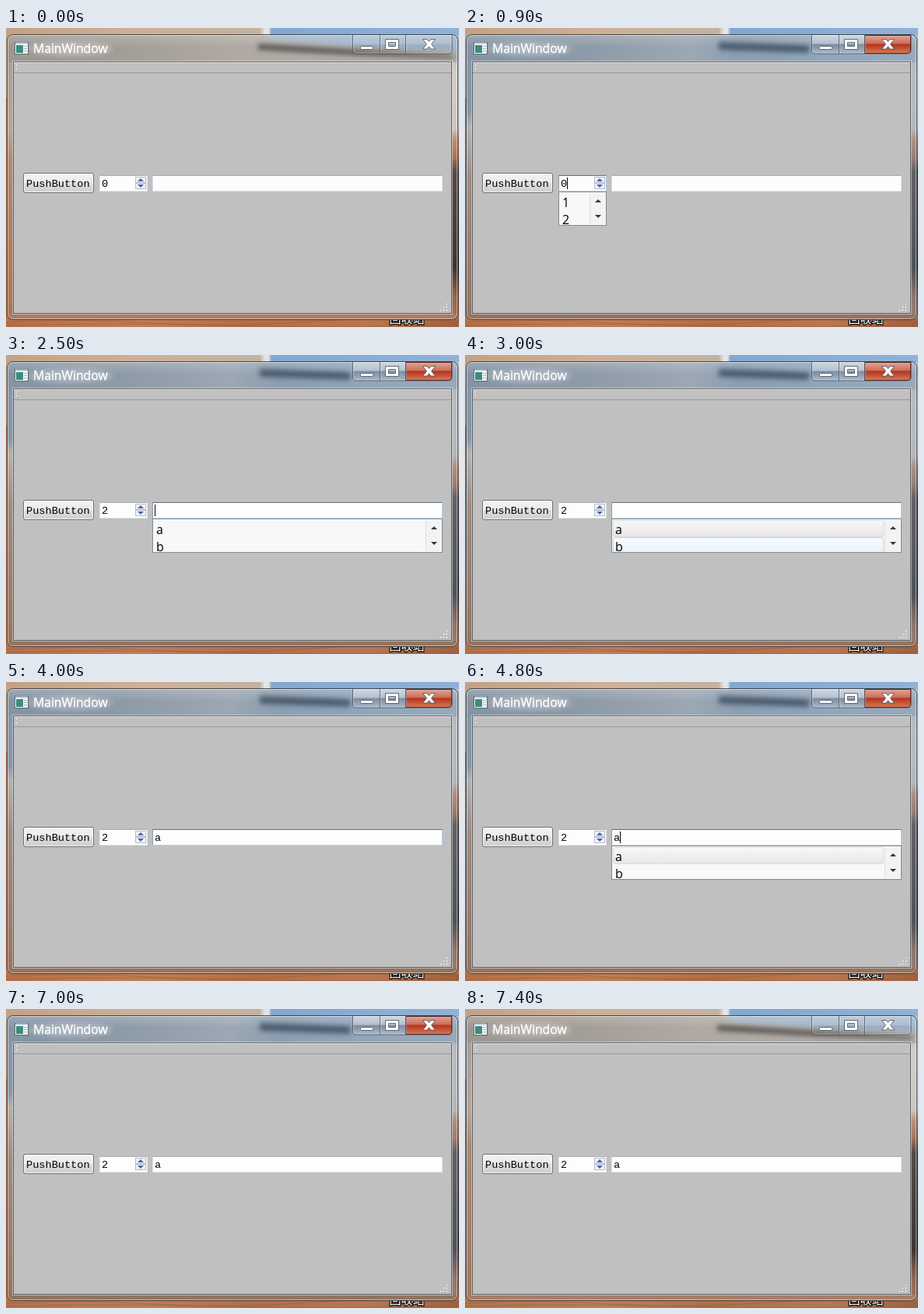
These frames come from a looping animation (582x384 px, 7.5 s). An HTML page:

```html
<!DOCTYPE html>
<html lang="en">
<head>
<meta charset="utf-8">
<title>Spin box and line edit</title>
<style>
  html, body { margin: 0; width: 100%; height: 100%; overflow: hidden; }
  body {
    --norm: #a9abb0 #dfe0e6 #e0e5ea #dfe0e6;
    --hot: #7d97ad #b9d2e6 #c6dfee #b9d2e6;
    --focus: #62707c #a6c8e2 #b7d7ea #8f9eab;
    --none: linear-gradient(transparent, transparent);
    --gray: linear-gradient(#f8f8f8, #e6e6e6);
    --blue: linear-gradient(#f7fbfe, #e8f3fc);
    --press: linear-gradient(#e4f1fc, #cbe3f8);
  }
  #stage { position: relative; width: 582px; height: 384px; overflow: hidden; background: #b37a58; }
  #stage > *, .popup > *, .spin i { position: absolute; box-sizing: border-box; }
  svg { left: 0; top: 0; }
  .anim { animation: 7.5s step-end infinite; }
  .active { animation-name: active; }
  .title { font: 15.7px "Open Sans", "Noto Sans", sans-serif; fill: #fff; stroke: #fff; stroke-width: .35px; }
  .label { font: 15px "Noto Sans CJK SC", "Noto Sans CJK", sans-serif; fill: #fff; }
  .mono { font: 13.6px/18px "Liberation Mono", monospace; color: #000; white-space: pre; }

  .button {
    left: 22px; top: 186px; width: 91px; height: 26px; border: 1px solid #707070; border-radius: 3px;
    padding: 5px 0 0 3px; box-shadow: inset 0 0 0 1px #fcfcfccc;
    animation-name: button;
  }
  .field { top: 189px; height: 21px; border: 1px solid; border-color: var(--norm); background: #fdfdfd; }
  .spin { left: 120px; width: 62px; animation-name: spin; }
  .line { left: 188px; width: 373px; animation-name: line; }
  .spin i { left: 45px; width: 14px; height: 8px; border: 1px solid #b5bccb; background: #f1f2f5; }
  .spin i:nth-child(1) { top: 1px; }
  .spin i:nth-child(2) { top: 9px; }
  .spin i::after, .bar::before, .bar::after { content: ""; position: absolute; background: #4b64ae; }
  .spin i::after { left: 2px; top: 1px; width: 8px; height: 4px; }
  .spin i:nth-child(1)::after, .bar::before { clip-path: polygon(50% 0, 100% 100%, 0 100%); }
  .spin i:nth-child(2)::after, .bar::after { clip-path: polygon(0 0, 100% 0, 50% 100%); }
  .value { top: 192px; opacity: 0; }
  .caret { top: 192px; width: 1px; height: 15px; background: #000; opacity: 0; }

  .popup {
    top: 210px; height: 44px; border: 1px solid #868b91; background: #f8f8f8;
    overflow: hidden; opacity: 0; font: 16px/22px "Open Sans", "Noto Sans", sans-serif;
  }
  .popup.p1 { left: 120px; width: 62px; animation-name: popup1; }
  .popup.p2 { left: 188px; width: 373px; animation-name: popup2; }
  .item { left: 1px; right: 22px; height: 22px; padding-left: 2px; border: 1px solid transparent; border-radius: 3px; }
  .item:nth-child(1) { top: 1px; }
  .item:nth-child(2) { top: 23px; }
  .bar { right: 0; top: 1px; width: 21px; height: 40px; border-left: 1px solid #dedede; background: #f3f3f3; }
  .bar::before, .bar::after { left: 6px; width: 8px; height: 4px; background: #383838; }
  .bar::before { top: 8px; }
  .bar::after { top: 28px; }

  @keyframes active { 0%, 98.66%, 100% { opacity: 0 } 12% { opacity: 1 } }
  @keyframes spin {
    0%, 32% { border-color: var(--norm) }
    8% { border-color: #96a4b0 #d2dce7 #d7e2eb }
    9.33%, 30.66% { border-color: var(--hot) }
    12% { border-color: var(--focus) }
  }
  @keyframes line {
    0% { border-color: #a3a8b0 #d6dee8 #d9e3ea }
    4%, 76% { border-color: var(--norm) }
    30.66% { border-color: #96a4b0 #d2dce7 #d7e2eb }
    32% { border-color: var(--hot) }
    33.33%, 73.33% { border-color: var(--focus) }
    66.66% { border-color: #6a7a88 #afcde3 #bbd9ea #97a7b4 }
  }
  @keyframes zero { 0% { opacity: 1 } 28%, 100% { opacity: 0 } }
  @keyframes two { 0% { opacity: 0 } 28%, 100% { opacity: 1 } }
  @keyframes letter { 0% { opacity: 0 } 53.33%, 100% { opacity: 1 } }
  @keyframes caret1 { 0%, 17.33%, 30.66%, 100% { opacity: 0 } 12%, 22.66% { opacity: 1 } }
  @keyframes caret2 {
    0%, 40% { opacity: 0; left: 191px }
    33.33%, 46.66% { opacity: 1; left: 191px }
    53.33%, 66.66%, 76%, 100% { opacity: 0; left: 199px }
    60%, 73.33% { opacity: 1; left: 199px }
  }
  @keyframes popup1 { 0%, 28%, 100% { opacity: 0 } 12% { opacity: 1 } }
  @keyframes popup2 { 0%, 53.33%, 76%, 100% { opacity: 0 } 33.33%, 64% { opacity: 1 } }
  @keyframes one-item {
    0% { background: var(--none); border-color: transparent }
    17.33% { background: var(--blue); border-color: #b8d6fb }
    21.33%, 100% { background: var(--gray); border-color: #dcdcdc }
  }
  @keyframes two-item {
    0% { background: var(--none); border-color: transparent }
    22.66% { background: #f3f8fc; border-color: #d4e5f8 }
    24% { background: var(--blue); border-color: #b8d6fb }
    26.66%, 100% { background: var(--press); border-color: #99c3ee }
  }
  @keyframes a-item {
    0% { background: var(--none); border-color: transparent }
    36%, 42.66% { background: var(--blue); border-color: #b8d6fb }
    38.66%, 53.33%, 100% { background: var(--gray); border-color: #dcdcdc }
  }
  @keyframes b-item {
    0%, 42.66%, 100% { background: var(--none); border-color: transparent }
    38.66% { background: #f3f8fc; border-color: #d4e5f8 }
    40% { background: var(--blue); border-color: #b8d6fb }
  }
  @keyframes button {
    0%, 93.33%, 100% { border-color: #707070; background: linear-gradient(#f2f2f2, #ebebeb 48%, #dddddd 52%, #cfcfcf) }
    77.33%, 90.66% { border-color: #567891; background: linear-gradient(#eef4f8, #e2eef4 48%, #cee2ee 52%, #bbd4e2) }
    78.66%, 86.66% { border-color: #3c7fb1; background: linear-gradient(#eaf6fd, #d9f0fc 48%, #bee6fd 52%, #a7d9f5) }
    81.33% { border-color: #2c628b; background: linear-gradient(#e0f1fa, #c4e5f6 48%, #98d1ef 52%, #7fc0e2) }
  }
</style>
</head>
<body>
<div id="stage">
  <svg width="582" height="384" viewBox="0 0 582 384">
    <defs>
      <linearGradient id="sky">
        <stop offset="0" stop-color="#c4a184"/><stop offset=".3" stop-color="#ceb197"/>
        <stop offset=".56" stop-color="#c4b2a0"/><stop offset=".572" stop-color="#e9e6e2"/>
        <stop offset=".58" stop-color="#dfe3e8"/><stop offset=".586" stop-color="#82a8d2"/><stop offset="1" stop-color="#8fb2d6"/>
      </linearGradient>
      <linearGradient id="wood">
        <stop offset="0" stop-color="#b5714a"/><stop offset=".3" stop-color="#c07d56"/>
        <stop offset=".55" stop-color="#b26e47"/><stop offset=".8" stop-color="#b97650"/><stop offset="1" stop-color="#a0623f"/>
      </linearGradient>
      <linearGradient id="warm">
        <stop offset="0" stop-color="#9c9690"/><stop offset=".25" stop-color="#a39d97"/>
        <stop offset=".5" stop-color="#b0a9a2"/><stop offset="1" stop-color="#b3afab"/>
      </linearGradient>
      <linearGradient id="cool">
        <stop offset="0" stop-color="#8494a5"/><stop offset=".25" stop-color="#8d9aa7"/><stop offset=".5" stop-color="#9ca8b3"/>
        <stop offset=".6" stop-color="#8c9eb1"/><stop offset=".8" stop-color="#91a6bc"/><stop offset="1" stop-color="#98a9ba"/>
      </linearGradient>
      <linearGradient id="leftWarm" x2="0" y2="1">
        <stop offset="0" stop-color="#a39d97"/><stop offset=".33" stop-color="#b3a69b"/>
        <stop offset=".45" stop-color="#ab8a74"/><stop offset="1" stop-color="#a87558"/>
      </linearGradient>
      <linearGradient id="leftCool" x2="0" y2="1">
        <stop offset="0" stop-color="#8799ab"/><stop offset=".27" stop-color="#8496a8"/><stop offset=".32" stop-color="#b3b2b2"/>
        <stop offset=".5" stop-color="#9c8d84"/><stop offset="1" stop-color="#96745f"/>
      </linearGradient>
      <linearGradient id="right" x2="0" y2="1">
        <stop offset="0" stop-color="#b9bbbd"/><stop offset=".14" stop-color="#cfcdca"/><stop offset=".33" stop-color="#cbc5c0"/>
        <stop offset=".37" stop-color="#bb8e72"/><stop offset=".43" stop-color="#a67458"/><stop offset=".48" stop-color="#544a46"/>
        <stop offset=".82" stop-color="#3b3534"/><stop offset=".92" stop-color="#94664e"/><stop offset="1" stop-color="#a87053"/>
      </linearGradient>
      <linearGradient id="sheen" x2="0" y2="1">
        <stop offset="0" stop-color="#fff" stop-opacity=".2"/><stop offset="1" stop-color="#fff" stop-opacity="0"/>
      </linearGradient>
      <linearGradient id="red" x2="0" y2="1">
        <stop offset="0" stop-color="#e0a799"/><stop offset=".45" stop-color="#cb6d57"/>
        <stop offset=".5" stop-color="#b5331f"/><stop offset="1" stop-color="#d57a55"/>
      </linearGradient>
      <linearGradient id="cap" x2="0" y2="1">
        <stop offset="0" stop-color="#fff" stop-opacity=".45"/><stop offset=".48" stop-color="#fff" stop-opacity=".25"/>
        <stop offset=".52" stop-color="#223" stop-opacity=".2"/><stop offset="1" stop-color="#fff" stop-opacity=".2"/>
      </linearGradient>
      <filter id="soft" x="-30%" y="-100%" width="160%" height="300%"><feGaussianBlur stdDeviation="3"/></filter>
      <clipPath id="frame"><rect x="2" y="9" width="578" height="365" rx="7"/></clipPath>
    </defs>

    <rect width="582" height="120" fill="url(#sky)"/>
    <rect y="90" width="582" height="294" fill="url(#wood)"/>
    <rect x="578" y="9" width="4" height="365" fill="url(#right)"/>
    <path d="M0 378q90-5 190 1t200-2 192 1M0 382q140-4 280 0t302-1" fill="none" stroke="#8f5836" stroke-opacity=".45"/>
    <text class="label" x="492.500" y="378.500" stroke="#111" stroke-width="2.500" paint-order="stroke">回收站</text>

    <g clip-path="url(#frame)">
      <rect x="2" y="9" width="10" height="365" fill="url(#leftWarm)"/>
      <rect x="570" y="9" width="10" height="365" fill="url(#right)"/>
      <rect x="2" y="9" width="578" height="35" fill="url(#warm)"/>
      <rect x="2" y="367" width="578" height="7" fill="#ab7d65"/>
      <path d="M338 5H590V30L450 24 338 15Z" fill="#a0b6cc" filter="url(#soft)"/>
      <path d="M324 20 450 28 575 35V39L450 35 324 28Z" fill="#5c5854" filter="url(#soft)"/>
      <g class="anim active">
        <rect x="2" y="9" width="10" height="365" fill="url(#leftCool)"/>
        <rect x="570" y="9" width="10" height="365" fill="#7e97b2" fill-opacity=".3"/>
        <rect x="2" y="9" width="578" height="35" fill="url(#cool)"/>
        <rect x="2" y="367" width="578" height="7" fill="#94745f"/>
        <path d="M326 17 442 22V32L326 28Z" fill="#4b5c6f" filter="url(#soft)"/>
      </g>
      <ellipse cx="83" cy="27" rx="54" ry="9" fill="#fff" fill-opacity=".28" filter="url(#soft)"/>
      <rect x="2" y="9" width="578" height="16" fill="url(#sheen)"/>
    </g>
    <g fill="none">
      <rect x="1.500" y="8.500" width="579" height="366" rx="7.500" stroke="#2f3236" stroke-opacity=".85"/>
      <rect x="2.500" y="9.500" width="577" height="364" rx="6.500" stroke="#fff" stroke-opacity=".5"/>
      <rect x="8.500" y="42.500" width="565" height="325" stroke="#fff" stroke-opacity=".45"/>
    </g>
    <rect x="9.500" y="43.500" width="563" height="323" fill="#c0c0c0" stroke="#5d5f62"/>
    <path d="M10 44.500H572" stroke="#e4e4e4"/>
    <path d="M10 57.500H572" stroke="#989898"/>
    <path d="M13 47h2v2h-2zm0 5h2v2h-2z" fill="#efefef"/>
    <path d="M14 48h1v1h-1zm0 5h1v1h-1z" fill="#909090"/>
    <path d="M566 354h2v2h-2zm0 4h2v2h-2zm-4 0h2v2h-2zm4 4h2v2h-2zm-4 0h2v2h-2zm-4 0h2v2h-2z" fill="#f2f2f2"/>
    <path d="M567 355h1v1h-1zm0 4h1v1h-1zm-4 0h1v1h-1zm4 4h1v1h-1zm-4 0h1v1h-1zm-4 0h1v1h-1z" fill="#8a8a8a"/>

    <rect x="11.500" y="18.500" width="17" height="15" fill="#f4f6f7" stroke="#5f6b73"/>
    <path d="M12 19.500H28" stroke="#b9c9d6" stroke-width="2"/>
    <rect x="13" y="22" width="9" height="10" fill="#3c8c80"/>
    <path d="M23 23.500h4M23 26.500h4M23 29.500h4" stroke="#aab2b8"/>
    <text class="title" x="35" y="32">MainWindow</text>

    <path id="caption" d="M445.500 9V28q0 5 5 5H568q5 0 5-5V9" fill="url(#cap)" fill-opacity=".3" stroke="#41474d" stroke-opacity=".7"/>
    <path class="anim active" d="M446 9V32H514V9Z" fill="url(#cap)" fill-opacity=".8"/>
    <path d="M446.500 10V28q0 4 4 4H567q4.500 0 4.500-4V10" fill="none" stroke="#fff" stroke-opacity=".35"/>
    <path class="anim active" d="M514 9.500H572.500V28q0 4.500-4.500 4.500H514Z" fill="url(#red)" stroke="#5a2a25"/>
    <path d="M480.500 9V33M513.500 9V33" stroke="#41474d" stroke-opacity=".7"/>
    <path d="M481.500 10V32M514.500 10V32" stroke="#fff" stroke-opacity=".35"/>
    <g fill="#fff" stroke="#474b55" stroke-opacity=".8">
      <rect x="455.500" y="23.500" width="16" height="4" rx="1"/>
      <path fill-rule="evenodd" d="M487.500 14.500H504.500V27.500H487.500ZM491.500 18.500V23.500H500.500V18.500Z"/>
      <path d="M535.500 14.500h5.500l2.500 3 2.500-3h5.500l-5 6.200 5 6.300h-5.500l-2.500-3.200-2.500 3.200h-5.500l5-6.300z"/>
    </g>
  </svg>

  <div class="button mono anim">PushButton</div>
  <div class="field spin anim"><i></i><i></i></div>
  <div class="field line anim"></div>
  <div class="value mono anim" style="left:123px;animation-name:zero">0</div>
  <div class="value mono anim" style="left:123px;animation-name:two">2</div>
  <div class="value mono anim" style="left:191px;animation-name:letter">a</div>
  <div class="caret anim" style="left:131px;animation-name:caret1"></div>
  <div class="caret anim" style="animation-name:caret2"></div>
  <div class="popup p1 anim">
    <div class="item anim" style="animation-name:one-item">1</div>
    <div class="item anim" style="animation-name:two-item">2</div>
    <div class="bar"></div>
  </div>
  <div class="popup p2 anim">
    <div class="item anim" style="animation-name:a-item">a</div>
    <div class="item anim" style="animation-name:b-item">b</div>
    <div class="bar"></div>
  </div>
</div>
</body>
</html>
```
